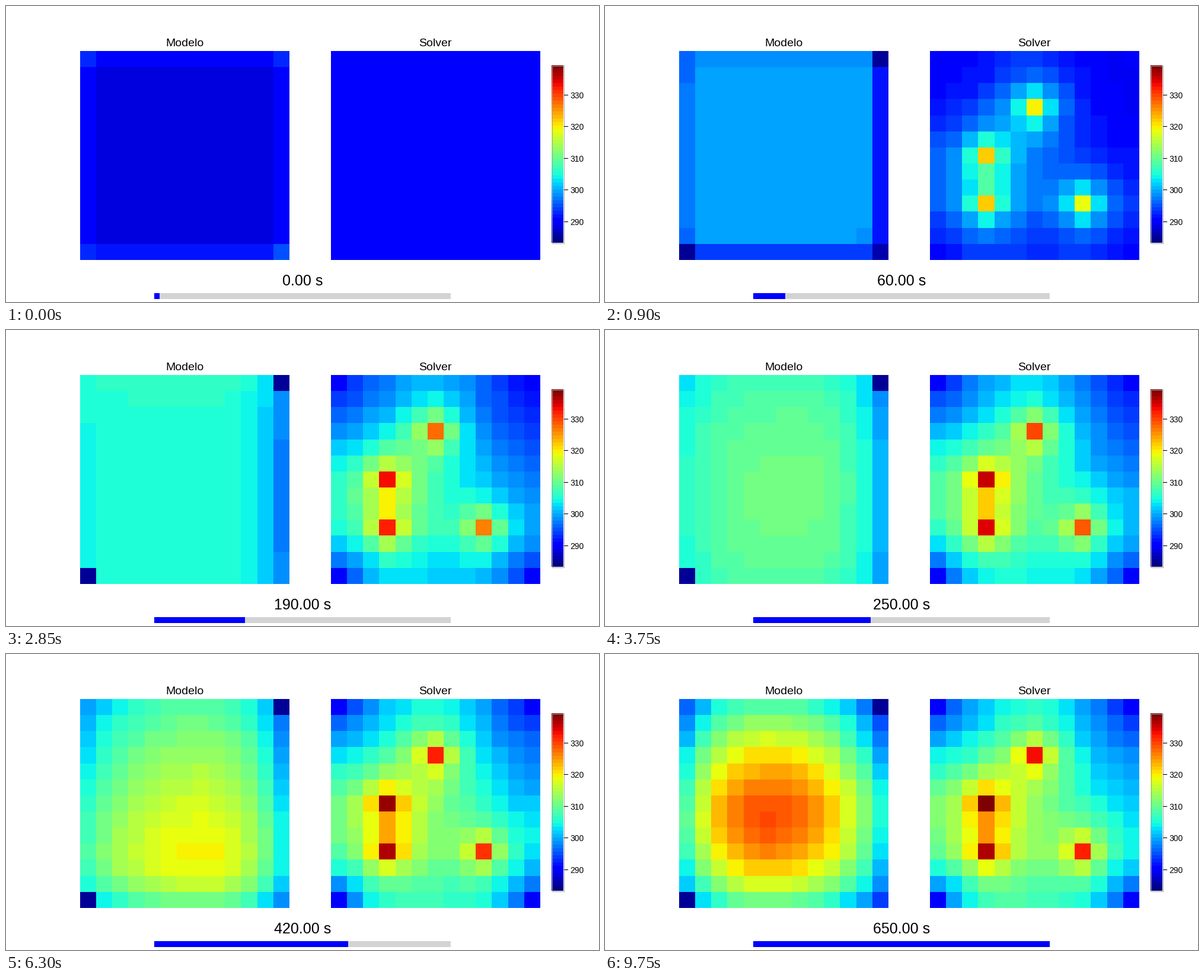
Write a matplotlib script that moves like this. It is 1000 px wide and 500 px high and loops after 9.9 s.

```python
import numpy as np
import matplotlib.pyplot as plt
from matplotlib.animation import FuncAnimation
from matplotlib.patches import Rectangle

plt.rcParams["font.family"] = "Liberation Sans"

W, H, DPI = 1000, 500, 100
FRAMES, INTERVAL = 66, 150
N = 13
STEP = 10  # simulated seconds per frame
VMIN, VMAX = 283.2, 339.35
CMAP = plt.get_cmap("jet", 50)

# Heat equation on a thin plate, corners held at a fixed temperature
T_START, T_ENV = 290.0, 285.0
DIFFUSION, HEATING, RADIATION = 0.0889, 66.7, 5.05e-10
HEATERS = [(6, 3), (9, 3), (3, 6), (9, 9)]


def simulate(dt=0.5):
    temp = np.full((N, N), T_START)
    source = np.zeros((N, N))
    for cell in HEATERS:
        source[cell] = HEATING
    fields = [temp.copy()]
    for _ in range(FRAMES - 1):
        for _ in range(int(STEP / dt)):
            p = np.pad(temp, 1, mode="edge")
            lap = p[2:, 1:-1] + p[:-2, 1:-1] + p[1:-1, 2:] + p[1:-1, :-2] - 4 * temp
            loss = RADIATION * (temp**4 - T_ENV**4)
            temp = temp + dt * DIFFUSION * (lap + source - loss)
            temp[::N - 1, ::N - 1] = T_START
        fields.append(temp.copy())
    return fields


def warm_up(t, start, rise, tau, power=1):
    return start + rise * (1 - np.exp(-((t / tau) ** power)))


def falloff(center, low_drop, high_drop, low_power, high_power):
    """Temperature drop along one axis, from the centre to either edge."""
    d = np.arange(N) - center
    low = low_drop * (np.maximum(-d, 0) / center) ** low_power
    high = high_drop * (np.maximum(d, 0) / (N - 1 - center)) ** high_power
    return low + high


def predict(t):
    """A dome that starts flat with a sharp rim, then rounds and wanders."""
    peak = np.interp(t, [0, 60, 140, 250, 420, 530, 650],
                     [288, 300, 300.5, 310.5, 319.5, 325.5, 329.5])
    row = np.interp(t, [250, 420, 530, 650], [6, 9, 7.2, 6.3])
    col = np.interp(t, [140, 250, 420, 650], [6, 6.5, 7.2, 5])
    power = 2.2 + 28 * np.exp(-t / 70)

    top = warm_up(t, 290.5, 18.5, 100)
    left = warm_up(t, 290.5, 19, 150)
    bottom = warm_up(t, 292, 19, 170, 2)
    right = warm_up(t, 290.5, 14.5, 230, 2)

    down = falloff(row, peak - top, peak - bottom, 0.6 * power, power)[:, None]
    across = falloff(col, peak - left, peak - right, power, power)
    field = peak - down - across + down * across / 60
    field[0, -1] = field[-1, 0] = np.interp(t, [0, 60], [293, 285])
    return field


solved = simulate()

fig = plt.figure(figsize=(W / DPI, H / DPI), dpi=DPI, facecolor="white")
ax = fig.add_axes([0, 0, 1, 1])
ax.axis("off")


def heatmap(data, left, right, top, bottom, vmin=VMIN, vmax=VMAX):
    return ax.imshow(data, cmap=CMAP, vmin=vmin, vmax=vmax, aspect="auto",
                     interpolation="nearest", origin="upper",
                     extent=(left, right, bottom, top))


def panel(title, left, data):
    ax.text(left + 176.2, 68, title, fontsize=14, ha="center", va="baseline")
    return heatmap(data, left, left + 353, 76, 429)


model_image = panel("Modelo", 125, predict(0))
solver_image = panel("Solver", 548, solved[0])

# Colour scale
heatmap(np.arange(50)[::-1, None], 920, 940, 100, 400, 0, 49)
ax.add_patch(Rectangle((920.5, 100.5), 20, 300, fill=False, ec="0.65", lw=0.72))
for value in range(290, 331, 10):
    y = 400 - (value - VMIN) / (VMAX - VMIN) * 300
    ax.plot([941, 946.5], [y, y], color="black", lw=0.8)
    ax.text(951.5, y + 0.5, str(value), fontsize=10, va="center_baseline")

clock = ax.text(500, 472, "", fontsize=18, ha="center", va="baseline")
ax.add_patch(Rectangle((250, 485), 500, 10, fc="lightgray", lw=0))
bar = ax.add_patch(Rectangle((250, 485), 0, 10, fc="blue", lw=0))

ax.set_xlim(0, W)
ax.set_ylim(H, 0)


def update(n):
    t = n * STEP
    model_image.set_data(predict(t))
    solver_image.set_data(solved[n])
    clock.set_text(f"{t:.2f} s")
    bar.set_width(min(500, 500 * (n + 1) / FRAMES + 1))
    return model_image, solver_image, clock, bar


anim = FuncAnimation(fig, update, frames=FRAMES, interval=INTERVAL,
                     repeat=True, repeat_delay=0)
plt.show()
```
